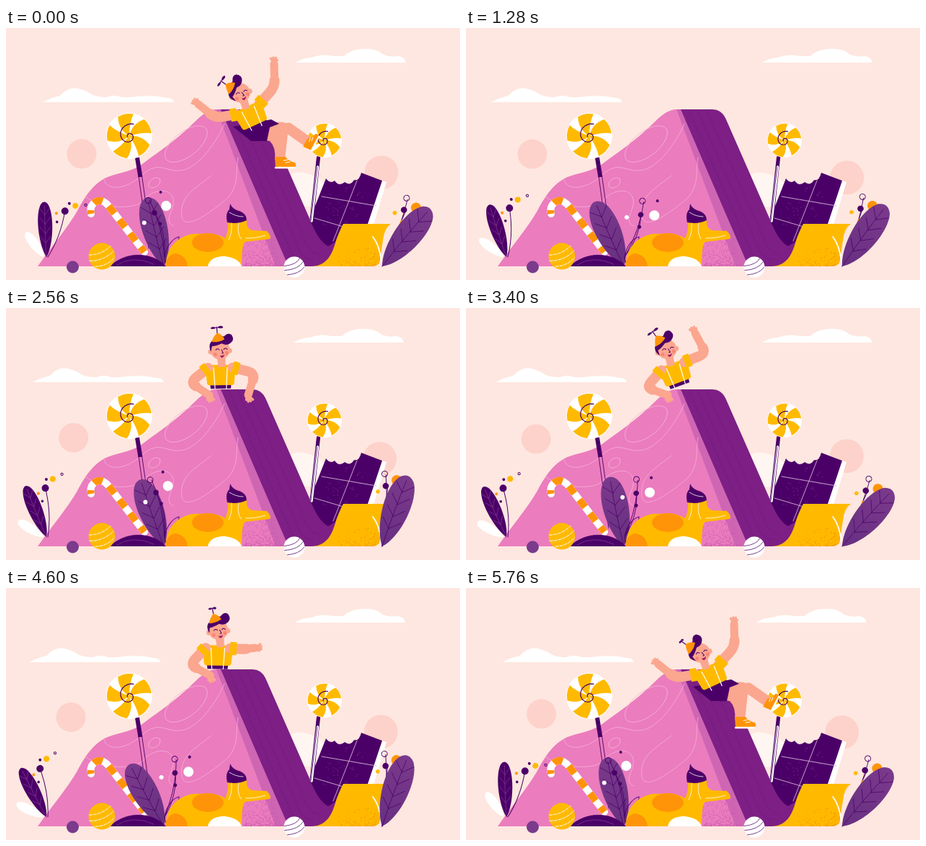
An HTML page that plays this animation: 630x350 px, repeating every 5800 ms.

```html
<!DOCTYPE html>
<html lang="en">
<head>
<meta charset="utf-8">
<title>Candy slide</title>
<style>
html, body { margin: 0; width: 100%; height: 100%; overflow: hidden; background: #fee7e0; }
svg { display: block; width: 630px; height: 350px; }
.line { fill: none; stroke-linecap: round; stroke-linejoin: round; }
</style>
</head>
<body>
<svg viewBox="0 0 630 350" xmlns="http://www.w3.org/2000/svg">
<defs>
  <linearGradient id="leafFill" x1="0" y1="0" x2="0" y2="1">
    <stop offset="0" stop-color="#7b3a8c"/><stop offset="1" stop-color="#672f80"/>
  </linearGradient>
  <clipPath id="waferClip"><use href="#wafer"/></clipPath>
</defs>

<g id="leftCloud"><path fill="#fff" d="M51 103Q62 97 75 94Q86 81 100 84Q112 87 120 93Q130 97 140 96Q150 92 160 96Q170 97 182 95Q205 93 222 97Q232 97 233 103Z"/></g>
<circle id="leftDisc" r="20.5" fill="#fdd2ca"/>
<circle id="rightDisc" r="23.5" fill="#fdd2ca"/>
<g id="rightCloud"><path fill="#fff" d="M403 48Q412 42 425 41Q440 35 455 39L470 39Q482 28 500 29Q515 28 525 37Q535 41 545 39Q555 40 556 48Z"/></g>
<path fill="#fff6f1" d="M385 245L390 207Q402 197 416 202Q430 204 450 222L440 250Z"/>

<g id="behind"></g>

<!-- chocolate bar -->
<path fill="#fff" d="M519 211L528 214L509 276L496 276Z"/>
<path fill="#4b0068" d="M444 209Q450 217 456 212Q462 221 470 214Q478 220 483 211Q490 213 493 201L522 212L500 278L455 312L430 300L420 270Z"/>
<path class="line" stroke="#d9b7d6" stroke-width=".9" d="M438 234L514 247M428 264L468 276M487 212L454 296"/>
<g id="chocGrain" fill="#7b3a8c"></g>

<!-- right lollipop -->
<g class="line"><path stroke="#4b0068" stroke-width="5.2" d="M433.5 180L424 268"/><path stroke="#fff" stroke-width="3.4" d="M432.5 193L424 268"/><path stroke="#4b0068" stroke-width=".8" d="M432 193L423 268"/></g>
<g id="lollyRight" transform="translate(442 156)"></g>

<!-- mountain -->
<path fill="#eb7cbe" d="M44 331C62 305 86 277 99 254C110 233 122 215 141 207C160 200 178 199 193 186C212 172 236 155 254 138C267 126 276 114 292 113L301 113L392 331Z"/>
<path fill="#cf66b4" d="M292 113L301 113L392 331L374 331Z"/>
<g class="line" stroke="#f6b0d9" stroke-width=".8">
  <ellipse cx="250" cy="161" rx="35" ry="17" transform="rotate(-38 250 161)"/>
  <ellipse cx="206" cy="215" rx="9" ry="6" transform="rotate(-35 206 215)"/>
  <path d="M136 210C138 226 165 226 188 205C215 180 222 205 250 196C275 186 296 150 303 133M111 235C135 252 180 252 190 240C200 226 225 220 231 235C238 250 215 268 233 275M285 205C265 222 240 232 244 262C248 283 285 255 303 240C325 222 318 200 322 180"/>
</g>
<g id="hillGrain" fill="#c85bae"></g>

<!-- ramp -->
<path id="wafer" fill="#ffba00" d="M415 331C438 328 450 316 456 301Q461 285 468 272L534 272Q525 278 523 295L519 322Q518 331 508 331Z"/>
<g id="waferGrain" fill="#f29600" clip-path="url(#waferClip)"></g>
<path class="line" stroke="#fff" stroke-width="1.8" d="M509 290Q518 301 521 324"/>
<path fill="#7d1f84" d="M298 113L342 113Q354 113 360 125L421 264Q433 296 447 303L457 297C453 316 443 331 424 331L402 331Q392 331 388 322Z"/>
<path class="line" stroke="#6b197c" stroke-width=".8" opacity=".6" d="M309 114L399 318Q404 328 417 328M321 114L408 310Q415 323 426 321M334 114L416 298Q423 314 435 314"/>

<!-- left lollipop -->
<g class="line"><path stroke="#4b0068" stroke-width=".9" d="M184 205L198 306M188.500 205L203 306"/><path stroke="#4b0068" stroke-width="6" stroke-linecap="butt" d="M182 180L186.500 207"/></g>
<g id="lollyLeft" transform="translate(171 150)"></g>

<!-- cane, lying sweet, balls -->
<g class="line" stroke-width="10"><path stroke="#fff" d="M118 258C115 244 127 237 135 241C142 244 145 252 150 257L192 311"/><path stroke="#ff9408" stroke-linecap="butt" stroke-dasharray="13 11" stroke-dashoffset="8" d="M118 258C115 244 127 237 135 241C142 244 145 252 150 257L192 311"/></g>
<g id="midPlant"></g>
<path fill="#4b0068" d="M143 331Q162 315 183 315Q207 315 222 331Z"/>
<path class="line" stroke="#7c3b8f" stroke-width=".8" d="M154 329Q177 315 205 328"/>
<circle cx="133" cy="317" r="18.500" fill="#ffba00"/>
<path class="line" stroke="#fff" stroke-width=".9" stroke-dasharray="4 2" transform="rotate(-18 133 317)" d="M117 310Q134 315 149 307M115 318Q134 324 151 315M120 328Q137 332 149 324"/>
<circle cx="92.500" cy="332" r="8.500" fill="#7b3a8c"/>
<path fill="#ffba00" d="M308 268L334 267Q333 279 342 281L362 282Q369 289 366 293L332 297Q327 300 327 331L222 331C221 300 246 284 268 286Q290 283 304 292Q309 282 308 268Z"/>
<path fill="#4b0068" d="M311 244Q314 252 326 255Q334 259 334 267Q322 273 307 270Q304 257 310 252Z"/>
<ellipse cx="280" cy="298" rx="22" ry="13" fill="#ff9408"/>
<path fill="#ff9408" d="M222 331Q222 315 235 313Q251 316 252 331Z"/>
<path fill="#fff" d="M280 331Q283 317 303 317Q323 319 327 331Z"/>
<path class="line" stroke="#fff" stroke-width=".8" d="M313 271Q314 285 309 294M323 271Q320 284 326 293M310 256Q319 262 329 262M333 292Q348 292 360 288"/>
<circle cx="400" cy="332" r="14.500" fill="#fff"/>
<path class="line" stroke="#7b3a8c" stroke-width=".9" transform="rotate(-15 400 332)" d="M387 327Q404 330 411 322M386 333Q404 337 414 328M388 340Q404 343 413 336"/>
<g id="leftPlant"></g>
<g id="rightPlant"></g>
<g id="front"></g>
</svg>

<script>
const LOOP = 5800, TAU = Math.PI * 2;
const DARK = '#4b0068', SKIN = '#fba68f', YELLOW = '#ffba00', ORANGE = '#ff9408';
const $ = id => document.getElementById(id);
const lerp = (a, b, k) => a + (b - a) * k;
const mix = (p, q, k) => p.map((v, i) => lerp(v, q[i], k));
const clamp = k => Math.max(0, Math.min(1, k));
const smooth = k => k * k * (3 - 2 * k);
const n = v => +v.toFixed(2);
const pt = p => n(p[0]) + ' ' + n(p[1]);
const polar = (a, r) => [Math.cos(a) * r, Math.sin(a) * r];
const add = (p, q) => [p[0] + q[0], p[1] + q[1]];
const path = (d, fill) => `<path d="${d}" fill="${fill}"/>`;
const line = (d, color, w) => `<path class="line" d="${d}" stroke="${color}" stroke-width="${w}"/>`;
const dot = (x, y, r, fill) => `<circle cx="${x}" cy="${y}" r="${r}" fill="${fill}"/>`;
const ring = (x, y, r) => `<circle class="line" cx="${x}" cy="${y}" r="${r}" stroke="${DARK}" stroke-width="1"/>`;
const rooted = (id, x, y, body) => `<g transform="translate(${x} ${y})"><g id="${id}">${body}</g></g>`;

function leaf(len, w, fill, vein) {
  const y = k => n(-len * k), x = k => n(w * k);
  let veins = `M0 0Q${x(-.1)} ${y(.5)} 0 ${y(.93)}`;
  for (let k = .25; k < .8; k += .17)
    veins += `M0 ${y(k)}L${x(-.65)} ${y(k + .12)}M0 ${y(k)}L${x(.65)} ${y(k + .12)}`;
  return path(`M0 0C${x(-.9)} ${y(.2)} ${x(-1.35)} ${y(.75)} ${x(-.5)} ${y(.95)}Q0 ${y(1.04)} ${x(.5)} ${y(.94)}C${x(1.25)} ${y(.75)} ${x(1)} ${y(.2)} 0 0`, fill)
    + (vein ? line(veins, vein, .7) : '');
}

$('leftPlant').innerHTML =
  rooted('whiteLeaf', 52, 318, leaf(42, 7, '#fff')) +
  rooted('leftDots', 58, 318,
    line('M0 0Q7 -32 0 -68', DARK, 1) + dot(0, -68, 5, DARK) + dot(11, -80, 4, YELLOW) +
    dot(2, -80, 2, DARK) + ring(24, -86, 1.6) + dot(-10, -61, 2, ORANGE) + dot(-5, -50, 1.8, DARK)) +
  rooted('leftLeaf', 56, 318, leaf(77, 10.5, DARK, '#7b3a8c'));
$('midPlant').innerHTML =
  rooted('midLeaf', 219, 331, leaf(99, 19, 'url(#leafFill)', DARK)) +
  rooted('midDots', 220, 318,
    line('M0 0Q2 -35 -15 -62M0 0Q-4 -45 -22 -78', DARK, .9) + dot(1, -71, 7, '#fff') + ring(-24, -78, 4) +
    dot(-15, -61, 3.7, DARK) + dot(-29, -47, 3, '#fff') + dot(-7, -90, 2, DARK) + dot(-7, -46, 2.5, DARK)) +
  `<g transform="translate(221 325) rotate(27)">${line('M0 0C-11 -14 -6 -34 1 -40C7 -28 9 -12 0 0', DARK, .9)}</g>`;
$('rightPlant').innerHTML =
  rooted('rightDots', 522, 331,
    line('M0 0Q-6 -45 -10 -82M0 0Q-2 -50 -16 -98', DARK, .9) + dot(0, -94, 7, ORANGE) + dot(-13, -83, 4.3, DARK) +
    ring(-18, -99, 4) + dot(-22, -73, 2.8, YELLOW) + dot(-7, -67, 2.5, ORANGE)) +
  rooted('rightLeaf', 522, 331, leaf(105, 20, 'url(#leafFill)', DARK));

function lolly(r) {
  const at = (a, k) => pt(polar(a, r * k));
  let petals = '', spiral = '';
  for (let i = 0; i < 5; i++) {
    const a = i * TAU / 5 - 2;
    petals += `M0 0Q${at(a - .6, .55)} ${at(a - .1, .97)}A${r} ${r} 0 0 1 ${at(a + .62, .97)}Q${at(a + .45, .6)} 0 0`;
  }
  for (let a = 0; a < 9; a += .25) spiral += (a ? 'L' : 'M') + at(a + 2.6, .08 + a * a * .0062);
  return dot(0, 0, r, '#fff') + path(petals, YELLOW) + line(spiral, DARK, 1.2);
}
$('lollyLeft').innerHTML = lolly(32);
$('lollyRight').innerHTML = lolly(24);

let seed = 7;
const random = () => (seed = seed * 16807 % 2147483647) / 2147483647;
function grain(id, count, place) {
  let out = '';
  for (let i = 0; i < count; i++) {
    const [x, y] = place(random(), random());
    out += `<rect x="${n(x)}" y="${n(y)}" width="1" height="1"/>`;
  }
  $(id).innerHTML = out;
}
grain('hillGrain', 330, (a, b) => [330 + a * 52 - b * b * 10, 330 - b * b * 38]);
grain('waferGrain', 200, (a, b) => [460 + Math.sqrt(a) * 62, 330 - b * b * 25]);
grain('chocGrain', 50, (a, b) => [450 + a * 48 - b * 15, 220 + b * 58]);

// Wind: p runs from 0 to 1 over the loop
const swing = (p, cycles, peak) => Math.cos(TAU * cycles * (p - peak));
const gust = p => p < .9 ? .5 * (1 - p / .9) + .5 * Math.exp(-12 * p) : smooth(clamp((p - .9) / .09));
const place = (id, x, y) => $(id).setAttribute('transform', `translate(${n(x)} ${n(y)})`);
const turn = (id, angle) => $(id).setAttribute('transform', `rotate(${n(angle)})`);

function drawWind(p) {
  const g = gust(p), breeze = swing(p, 3, .62);
  const left = -12 + 5 * swing(p, 1, 0) + 8 * swing(p, 2, .04);
  const right = 1 + 7 * swing(p, 3, .9);
  place('leftCloud', left, 0);
  place('leftDisc', 105 + left * .8, 178 - 4 * swing(p, 1, .1));
  place('rightCloud', right, 0);
  place('rightDisc', 522 + right * .85, 204.5 + 5.5 * swing(p, 1, .37));
  turn('leftLeaf', -29 + 27 * g);
  turn('whiteLeaf', -65 + 30 * g);
  turn('leftDots', -11 + 31.5 * g);
  turn('midLeaf', -20 + 9 * swing(p, 2, .06));
  turn('midDots', 18 - 17 * Math.cos(2 * TAU * p + .63 * (1 - Math.cos(TAU * p))));
  turn('rightLeaf', 32 + 12 * breeze);
  turn('rightDots', 23 + 11 * breeze);
}

// Hip x y, body lean, hat tilt, left hand, right hand
const lean = [298, 112, -1, -12, 282, 121, 336, 121];
const wave = [297, 108, -20, -42, 280, 121, 318, 35];
const point = [297, 110, -16, -40, 280, 121, 350, 47];
const crouch = [290, 115, 18, 2, 287, 122, 341, 119];
const leap = [314, 100, 2, -12, 262, 47, 368, 30];
const ride = [348, 139, -25, -62, 267, 106, 372, 50];
const acts = [[1500, lean], [2640, lean], [3200, wave], [3500, wave], [4000, point], [4350, point],
  [4850, crouch], [5160, crouch], [5460, leap], [5740, ride], [LOOP, ride]];

function poseAt(t) {
  if (t < 1000) return ride;
  let i = 0;
  while (i < acts.length - 2 && acts[i + 1][0] <= t) i++;
  const [[a, from], [b, to]] = [acts[i], acts[i + 1]];
  return mix(from, to, smooth(clamp((t - a) / (b - a))));
}

// Elbow of two equal bones, always bent away from the body
function elbow(s, h, side) {
  const dx = h[0] - s[0], dy = h[1] - s[1], dist = Math.hypot(dx, dy) || 1;
  const bend = Math.sqrt(Math.max(0, 32 * 32 - dist * dist / 4)) * Math.min(1, 3 * Math.abs(dy) / dist);
  const out = side * Math.sign(dy || 1) * bend / dist;
  return add(mix(s, h, .5), [dy * out, -dx * out]);
}

function arm(s, h, side) {
  const e = elbow(s, h, side), angle = (a, b) => Math.atan2(b[1] - a[1], b[0] - a[0]);
  const palm = h[1] > e[1] ? 1.25 : angle(e, h);
  let out = line(`M${pt(s)}L${pt(mix(s, e, .65))}Q${pt(e)} ${pt(mix(e, h, .3))}`, SKIN, 14) +
    line(`M${pt(mix(s, e, .65))}Q${pt(e)} ${pt(mix(e, h, .3))}L${pt(h)}`, SKIN, 11);
  for (let i = 0; i < 4; i++)
    out += line(`M${pt(h)}l${pt(polar(palm - .5 + i * .4, i < 3 ? 9 : 7))}`, SKIN, 3.4);
  return out + `<path d="M${pt(s)}L${pt(add(s, polar(angle(s, e), 9)))}" stroke="${YELLOW}" stroke-width="18"/>`;
}

function head(at, tilt, t) {
  const b = n(4 + 3 * Math.cos(t / 45));
  return `<g transform="translate(${pt(at)})"><g transform="rotate(${n(tilt * .3)})">` +
    path('M-5 8L7 8L6 24L-4 24Z', SKIN) + dot(-13, 2, 3.7, SKIN) + dot(13, 2, 3.5, SKIN) +
    dot(0, 0, 13.5, SKIN) + dot(-7, 6, 2.5, '#f98576') + dot(9, 5, 2.5, '#f98576') +
    line('M-6 0q2 -3 5 0M5 0q2 -3 5 0M2 0l2 5l-2 0', DARK, 1) + path('M-1 8Q3 9 6 7Q4 12 1 11Z', '#a41d68') +
    `</g><g transform="rotate(${n(tilt)})">` +
    path('M-13 0Q-16 -14 -3 -16Q4 -19 9 -17Q16 -22 20 -17Q23 -9 16 -6Q10 -3 4 -8Q-5 -6 -10 -7Z', DARK) +
    path('M-9 -13Q-7 -18 1 -24Q8 -19 9 -13Q0 -10 -9 -13Z', ORANGE) + line('M1 -24L2 -32', DARK, 1.2) +
    path(`M2 -31q${-b} -4 ${-b - 2} -1q2 3 ${b + 2} 1q${b} 4 ${b + 2} 1q-2 -4 ${-b - 2} -1`, DARK) +
    '</g></g>';
}

const shoe = color => path('M-12 -8L3 -8Q7 -2 16 0Q19 4 15 7L-11 7Z', color) +
  line('M-11 7L15 7', '#fff', 2.5) + line('M0 -3l6 -1M3 0l6 -1', '#fff', 1);
const LEGS = line('M374 142L392 139L416 156', SKIN, 15) +
  `<g transform="translate(423 159) rotate(-62) scale(.85)">${shoe(ORANGE)}</g>` +
  path('M352 155L362 134Q374 129 386 131Q394 136 391 147L387 183L373 183Q375 166 366 157Z', SKIN) +
  `<g transform="translate(385 187)">${shoe(ORANGE)}</g>` +
  path('M315 137L368 127L379 133L366 138L362 157L340 157Z', DARK);

// Down the ramp, then off its lip
function slideOffset(t) {
  const k = Math.pow(clamp(t / 400), 1.4), fly = clamp((t - 400) / 320);
  return [115 * k + 275 * fly, 150 * k - 150 * fly + 40 * fly * fly, -20 * fly];
}

function drawBoy(t) {
  $('behind').innerHTML = $('front').innerHTML = '';
  if (t >= 720 && t < 1820) return;
  const [x, y, tilt, hat, lx, ly, rx, ry] = poseAt(t);
  const hip = [x, y], a = tilt * TAU / 360, up = a - TAU / 4;
  const chest = add(hip, polar(up, 29));
  const [sL, sR, wL, wR] = [[chest, -17], [chest, 17], [hip, -14], [hip, 14]].map(([c, r]) => add(c, polar(a, r)));
  const waist = k => pt(mix(wL, wR, k)), top = k => pt(mix(sL, sR, k));
  const body = path(`M${pt(wL)}L${pt(mix(wL, sL, .25))}L${pt(mix(wR, sR, .25))}L${pt(wR)}Z`, DARK) +
    `<path d="M${pt(mix(wL, sL, .3))}L${top(0)}L${top(1)}L${pt(mix(wR, sR, .3))}Z" fill="${YELLOW}" stroke="${YELLOW}" stroke-width="8" stroke-linejoin="round"/>` +
    [.22, .78].map(k => line(`M${waist(k)}L${top(k)}`, '#fff', 1.2)).join('') +
    head(add(chest, polar(up, 25)), hat, t);
  const arms = arm(sL, [lx, ly], -1) + arm(sR, [rx, ry], 1);

  if (t < 1000 || t > 5380) {
    const [dx, dy, spin] = slideOffset(t < 1000 ? t : 0);
    $('front').innerHTML = `<g transform="translate(${n(dx)} ${n(dy)}) rotate(${n(spin)} 345 130)">` +
      `<g transform="translate(${n(x - ride[0])} ${n(y - ride[1])})">${LEGS}</g>${arms}${body}</g>`;
    return;
  }
  const u = clamp((t - 1820) / 480) - 1, rise = -110 * u * u * (2.2 * u + 1.2);
  const shifted = s => `<g transform="translate(0 ${n(rise)})">${s}</g>`;
  const gripping = rise <= 12;
  $('behind').innerHTML = shifted(gripping ? body : body + arms);
  if (gripping) $('front').innerHTML = shifted(arms);
}

const start = performance.now();
function tick() {
  const t = (performance.now() - start) % LOOP;
  drawWind(t / LOOP);
  drawBoy(t);
  requestAnimationFrame(tick);
}
tick();
</script>
</body>
</html>
```
